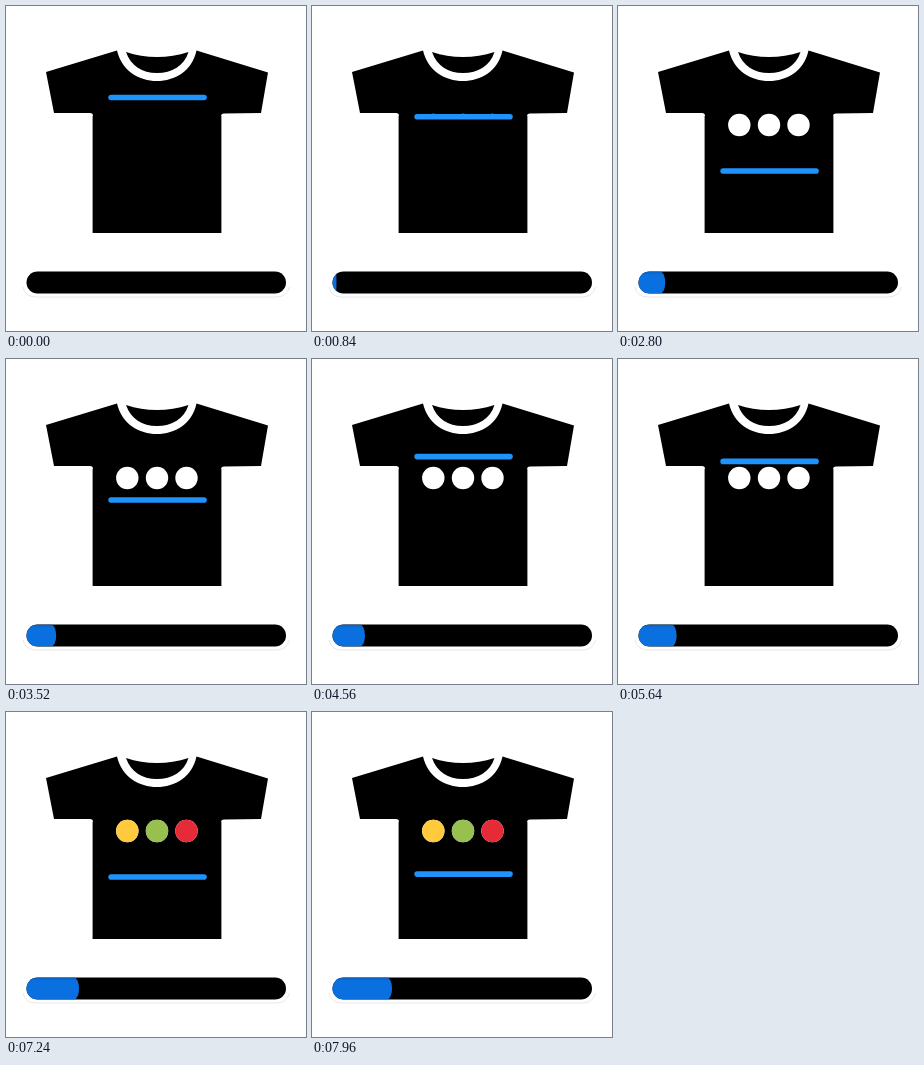
Write an HTML page that moves like this. It is 300 px wide and 325 px high and loops after 8 s.

```html
<!DOCTYPE html>
<html lang="en">
<head>
<meta charset="utf-8">
<title>T-shirt printing progress</title>
<style>
  html, body { margin: 0; width: 100%; height: 100%; overflow: hidden; background: #fff; }
  svg { display: block; width: 300px; height: 325px; }
</style>
</head>
<body>
<svg viewBox="0 0 300 325">
  <defs>
    <g id="dots">
      <circle cx="121.3" cy="119" r="11.2"/>
      <circle cx="151" cy="119" r="11.2"/>
      <circle cx="180.5" cy="119" r="11.2"/>
    </g>
    <clipPath id="whiteClip"><rect id="whiteArea" x="100" y="80" width="102"/></clipPath>
    <clipPath id="colorClip"><rect id="colorArea" x="100" y="80" width="102"/></clipPath>
    <clipPath id="trackClip"><rect x="20.5" y="265.5" width="259.5" height="22" rx="11"/></clipPath>
    <linearGradient id="blue" x2="0" y2="1">
      <stop offset="0" stop-color="#0a5cb8"/>
      <stop offset=".14" stop-color="#0a70df"/>
    </linearGradient>
  </defs>

  <!-- shirt -->
  <path d="M111 44.5 L40 66 L48 107 H84 Q87 107 87 110 V227 H215 V110.5 Q215 107.5 218 107.5 L255 107 L262 66.5 L190.500 44.5
           C186 65 169 75 151 75 S116 65 111 44.5Z"/>
  <path d="M120 46 C125 60 136 67 151 67 S178 60 182.500 46 C172 49.5 162 51 151 51 S130 49.5 120 46Z"/>
  <path d="M86.500 110V227M215.500 110V227" stroke="#999"/>

  <!-- print -->
  <g clip-path="url(#whiteClip)"><use href="#dots" fill="#fff"/></g>
  <g clip-path="url(#colorClip)">
    <circle cx="121.3" cy="119" r="11.2" fill="#ffca3c"/>
    <circle cx="151" cy="119" r="11.2" fill="#98c04f"/>
    <circle cx="180.5" cy="119" r="11.2" fill="#e62b38"/>
  </g>
  <rect id="scanner" x="102.3" width="98.5" height="5.6" rx="2.8" fill="#1e93fb"/>

  <!-- progress -->
  <path d="M17 281 Q19 291 30 291 H270 Q281 291 283.500 281" fill="none" stroke="#e8e8e8"/>
  <rect x="20.5" y="265.5" width="259.5" height="22" rx="11"/>
  <path id="fill" fill="url(#blue)" clip-path="url(#trackClip)"/>
</svg>
<script>
  const LOOP = 8000, SWEEP = 5020, TOP = 91.5, TRAVEL = 76;
  const progress = [[0, 20], [840, 24.5], [1680, 36.5], [2000, 40], [2520, 46], [3360, 49.7],
                    [4200, 52.2], [5040, 54], [5880, 60.5], [6720, 68], [8000, 80.4]];
  const el = id => document.getElementById(id);

  function interpolate(points, t) {
    const i = Math.max(1, points.findIndex(p => p[0] >= t));
    const [t0, a] = points[i - 1], [t1, b] = points[i];
    return a + (b - a) * (t - t0) / (t1 - t0);
  }

  // The first downward sweep prints white, the second prints color.
  function reveal(id, y, t, start) {
    const height = t < start ? 0 : t < start + SWEEP / 2 ? y - 80 : 100;
    el(id).setAttribute('height', height);
  }

  function draw(t) {
    const y = TOP + TRAVEL * (1 - Math.cos(2 * Math.PI * t / SWEEP)) / 2;
    el('scanner').setAttribute('y', y - 2.8);
    reveal('whiteArea', y, t, 0);
    reveal('colorArea', y, t, SWEEP);

    const edge = interpolate(progress, t);
    const bulge = Math.min(5, (edge - 20) / 5);
    el('fill').setAttribute('d',
      `M20 265.5 H${edge - bulge} A${bulge} 11 0 0 1 ${edge - bulge} 287.5 H20Z`);
  }

  function frame() {
    draw(performance.now() % LOOP);
    requestAnimationFrame(frame);
  }
  frame();
</script>
</body>
</html>
```
